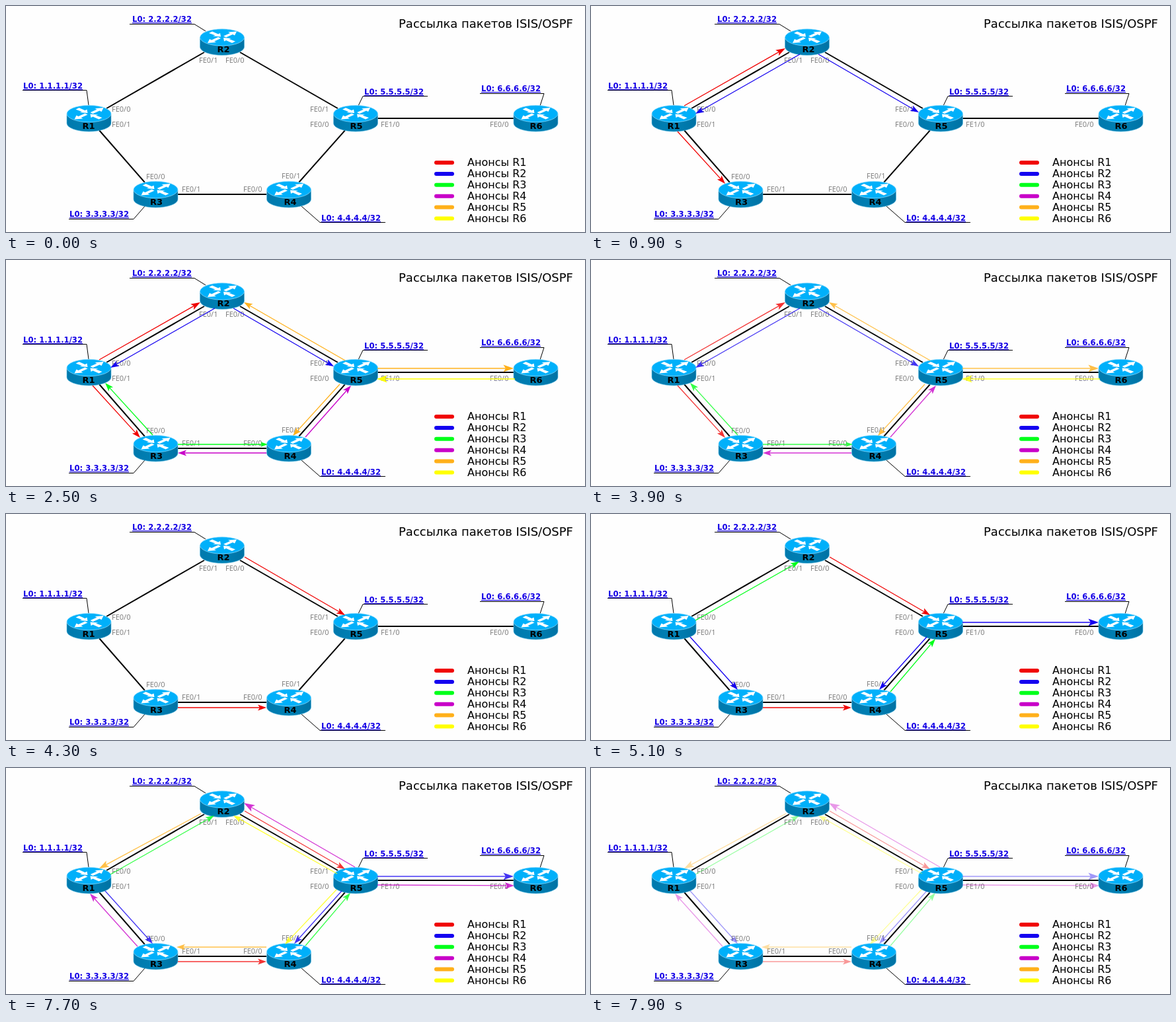
Animation, 876 px wide and 342 px high, one loop 8000 ms. Source, as an HTML page:

```html
<!DOCTYPE html>
<html lang="ru">
<head>
<meta charset="utf-8">
<title>Рассылка пакетов</title>
<style>
html, body { margin: 0; width: 100%; height: 100%; overflow: hidden; background: #fefefe; }
svg { display: block; width: 876px; height: 342px; font-family: "DejaVu Sans", sans-serif; }
.title { font-size: 18px; }
.legend text { font-size: 16px; }
.legend line { stroke-width: 6; stroke-linecap: round; }
.link { stroke: #000; stroke-width: 2; }
.callout { fill: none; stroke: #000; stroke-width: 1; }
.address { font-size: 11.6px; font-weight: bold; fill: #1400e6; text-decoration: underline; }
.port { font: 11px "Noto Sans", sans-serif; fill: #808080; }
.name { font-size: 13px; font-weight: bold; text-anchor: middle; }
.arrow { stroke-width: 1.3; }
.arrow path { stroke: none; }

.phase, .wave { animation: 8s step-end infinite; }
.first { animation-name: fade-first; }
.second { animation-name: fade-second; }
.wave { opacity: 0; animation-name: reveal; }
@keyframes reveal { 0% { opacity: 1; } 47.5%, 100% { opacity: 0; } }
@keyframes fade-first {
  0% { opacity: 1; } 48.75% { opacity: .8; } 50% { opacity: .6; }
  51.25% { opacity: .4; } 52.5% { opacity: .2; } 53.75%, 100% { opacity: 0; }
}
@keyframes fade-second {
  0% { opacity: 0; } 53.75% { opacity: 1; } 96.25% { opacity: .8; }
  97.5% { opacity: .6; } 98.75%, 100% { opacity: .4; }
}
</style>
</head>
<body>
<svg id="stage" viewBox="0 0 876 342">
  <defs>
    <linearGradient id="side">
      <stop offset="0" stop-color="#0079ad"/>
      <stop offset=".5" stop-color="#0080b4"/>
      <stop offset="1" stop-color="#0072a4"/>
    </linearGradient>
    <g id="router">
      <path d="M-33.5-7V7.5A33.5 12.5 0 0 0 33.5 7.5V-7Z" fill="url(#side)" stroke="#5fbfe6" stroke-width=".6"/>
      <ellipse cy="-7" rx="33.5" ry="12.7" fill="#00b0fa" stroke="#9be0ff" stroke-width=".7"/>
      <g id="half" fill="#fff">
        <path d="M9-15L22-16L19-10L16-11.5L6-7L2-9L12-13.5Z"/>
        <path d="M-20-13.5L-15-16L-6-12L-3-13.5L-2-8L-14-9L-10.5-10Z"/>
      </g>
      <use href="#half" transform="rotate(180 0 -7.2)"/>
    </g>
  </defs>
</svg>
<script>
const stage = document.getElementById("stage");

function add(parent, tag, attrs, text = "") {
  const node = document.createElementNS("http://www.w3.org/2000/svg", tag);
  for (const key in attrs) node.setAttribute(key, attrs[key]);
  node.textContent = text;
  return parent.appendChild(node);
}

const addLine = (parent, [x1, y1, x2, y2], attrs) => add(parent, "line", { x1, y1, x2, y2, ...attrs });

const colors = {
  red: "#f00000", blue: "#1400f0", green: "#00ff1a",
  purple: "#c800c8", orange: "#ffb01a", yellow: "#ffff00"
};

const links = [
  [152, 155, 300, 70], [354, 70, 502, 155], [562, 170, 768, 170],
  [141, 188, 210, 267], [260, 285, 394, 285], [443, 267, 513, 188]
];

// Router centre, name centre, address position and callout line
const routers = [
  [125.5, 170, 125, 26, 125, "25 127.5H122L125 150"],
  [327, 54.5, 329, 191, 24, "187 27.5H285L302 38"],
  [226.5, 285, 227.5, 96, 319, "95 322.5H193L210 303"],
  [428, 285, 430, 477, 325, "574 327.5H475L447 303"],
  [529, 170, 530, 542, 134, "638 136.5H540L533 151"],
  [801.5, 170, 802, 719, 129, "717 132.5H814L808 151"]
];

const ports = [
  ["FE0/0", 160, 160], ["FE0/1", 160, 183], ["FE0/1", 292, 86], ["FE0/0", 332, 86],
  ["FE0/1", 460, 160], ["FE0/0", 460, 183], ["FE1/0", 567, 183], ["FE0/0", 732, 183],
  ["FE0/0", 212, 262], ["FE0/1", 266, 281], ["FE0/0", 359, 281], ["FE0/1", 417, 261]
];

// Arrows as start, tip and optional head scale
const phases = {
  first: {
    red: [[141, 151, 294, 64, 1.1], [131, 190, 203, 269]],
    blue: [[316, 73, 158, 163], [344, 73, 496, 161]],
    green: [[222, 265, 150, 186], [260, 279, 396, 279, .85]],
    purple: [[394, 292, 260, 292], [453, 268, 522, 190]],
    orange: [[513, 152, 360, 64], [562, 164, 768, 164, 1.2], [505, 188, 434, 266]],
    yellow: [[770, 180, 561, 180, 1.2]]
  },
  second: {
    red: [[361, 65, 513, 153], [260, 293, 394, 293]],
    blue: [[150, 186, 222, 266], [508, 186, 436, 266], [562, 164, 768, 164, 1.2]],
    green: [[158, 161, 315, 72], [453, 269, 521, 189]],
    purple: [[199, 270, 127, 190], [528, 150, 360, 53, 1.25], [562, 177, 769, 178, 1.1]],
    orange: [[295, 69, 141, 152, 1.15], [394, 271, 258, 271]],
    yellow: [[501, 160, 344, 72], [500, 184, 422, 267]]
  }
};

function addArrow(parent, [x1, y1, x2, y2, scale = 1]) {
  const angle = Math.atan2(y2 - y1, x2 - x1);
  const inset = 8 * scale;
  const arrow = add(parent, "g", { class: "arrow" });
  addLine(arrow, [x1, y1, x2 - inset * Math.cos(angle), y2 - inset * Math.sin(angle)]);
  add(arrow, "path", {
    d: "M0 0L-13-4.5L-10 0L-13 4.5Z",
    transform: `translate(${x2} ${y2}) rotate(${angle * 180 / Math.PI}) scale(${scale})`
  });
}

for (const link of links) addLine(stage, link, { class: "link" });
for (const [label, x, y] of ports) add(stage, "text", { x, y, class: "port" }, label);

routers.forEach(([cx, cy, nameX, x, y, callout], i) => {
  const n = i + 1;
  add(stage, "path", { d: "M" + callout, class: "callout" });
  add(stage, "text", { x, y, class: "address" }, `L0: ${n}.${n}.${n}.${n}/32`);
  add(stage, "use", { href: "#router", x: cx, y: cy });
  add(stage, "text", { x: nameX, y: cy + 15.5, class: "name" }, "R" + n);
});

add(stage, "text", { x: 594, y: 33, class: "title" }, "Рассылка пакетов ISIS/OSPF");

const legend = add(stage, "g", { class: "legend" });
Object.values(colors).forEach((stroke, i) => {
  const y = 237 + i * 16.9;
  addLine(legend, [651, y, 675, y], { stroke });
  add(legend, "text", { x: 698, y: Math.round(y + 5) }, "Анонсы R" + (i + 1));
});

const phaseStart = { first: 0.5, second: 4.3 };
for (const phase in phases) {
  const group = add(stage, "g", { class: "phase " + phase });
  Object.entries(phases[phase]).forEach(([color, arrows], i) => {
    const wave = add(group, "g", { class: "wave", fill: colors[color], stroke: colors[color] });
    wave.style.animationDelay = phaseStart[phase] + i * 0.4 + "s";
    for (const arrow of arrows) addArrow(wave, arrow);
  });
}
</script>
</body>
</html>
```
